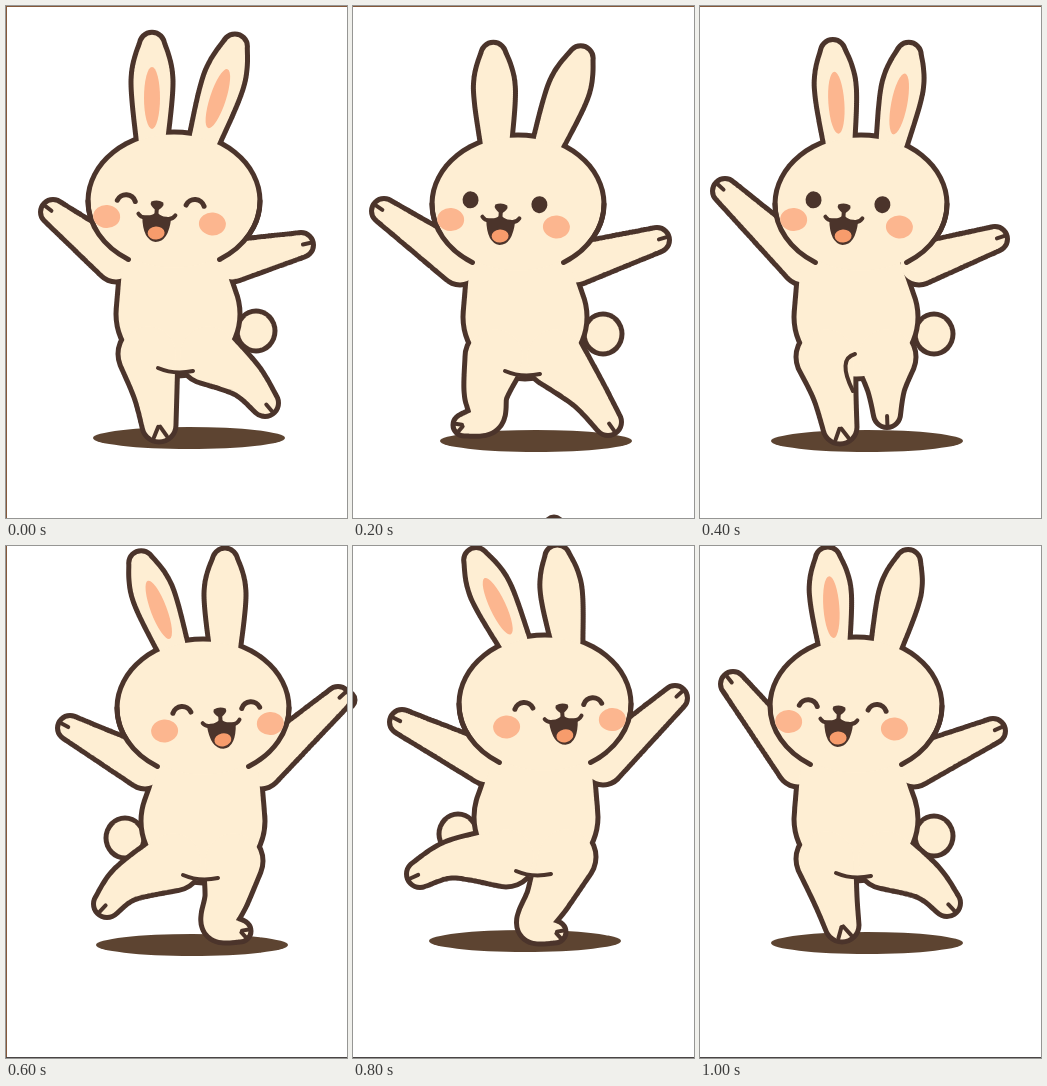
An HTML page that plays this animation: 341x512 px, repeating every 1.2 s.

```html
<!DOCTYPE html>
<html lang="en">
<head>
<meta charset="utf-8">
<title>Dancing bunny</title>
<style>
  html, body { margin: 0; width: 100%; height: 100%; overflow: hidden; background: #fff; }
  svg { display: block; width: 100%; height: 100%; }
  .ink { fill: #4b342b; }
  .fur { fill: #feeed3; }
  .pink { fill: #fcb68f; }
  .tongue { fill: #f79c6c; }
  .shade { fill: #5d4431; }
  .edge { fill: #85593a; }
  .floor { fill: #4a4544; }
  .line { fill: none; stroke: #4b342b; stroke-width: 4; }
  .bold { stroke-width: 5; }
</style>
</head>
<body>
<svg id="stage" viewBox="0 0 341 512" stroke-linecap="round" stroke-linejoin="round"></svg>
<script>
const STEP = 200;
const HALF = 2.5; // half the outline width
const HEAD = [86, 69];

// Key points only: the rest of the body follows from head, facing and sway.
const poses = [
  { head: [168, 195], facing: -1, sway: 4, tips: [[146, 26], [233, 28]], pinks: 2,
    hands: [[47, 206], [295, 239]],
    planted: [[149, 385], [153, 419]], lifted: [[238, 372], [259, 397]], edges: "left top" },
  { head: [165, 198], facing: -1, sway: 7, tips: [[140, 37], [232, 41]], pinks: 0, open: true,
    hands: [[31, 205], [304, 234]],
    planted: [[133, 385], [133, 411], [111, 419]], lifted: [[233, 385], [255, 416]],
    edges: "top", peek: [201, 519] },
  { head: [161, 198], facing: -1, sway: -5, tips: [[132, 34], [211, 37]], pinks: 2, open: true,
    hands: [[25, 185], [295, 233]],
    planted: [[134, 385], [140, 421]], lifted: [[186, 380], [187, 408]],
    edges: "top", fold: [[-3, 74], [-19, 42], [-1, 37]] },
  { head: [197, 162], facing: 1, sway: 0, tips: [[131, 6], [219, 3]], pinks: 1,
    hands: [[64, 182], [332, 153]],
    planted: [[221, 350], [213, 378], [234, 385]], lifted: [[122, 336], [101, 358]], edges: "left bottom" },
  { head: [192, 158], facing: 1, sway: -9, tips: [[118, 3], [203, 0]], pinks: 1,
    hands: [[49, 176], [322, 152]],
    planted: [[196, 350], [181, 379], [202, 386]], lifted: [[100, 313], [67, 328]],
    edges: "bottom", peek: [-6, 154] },
  { head: [156, 160], facing: -1, sway: 0, tips: [[127, 2], [211, 5]], pinks: 1,
    hands: [[33, 138], [293, 185]],
    planted: [[135, 350], [142, 379]], lifted: [[225, 334], [247, 357]], edges: "bottom" }
];

const EDGES = {
  left: ["edge", 0, 0, 1, 512], top: ["edge", 0, 0, 341, 1], bottom: ["floor", 0, 511, 341, 1]
};

const add = ([x, y], dx, dy) => [x + dx, y + dy];
const mix = (a, b, t) => a.map((v, i) => v + (b[i] - v) * t);
const angle = (a, b) => Math.atan2(b[1] - a[1], b[0] - a[0]);
const polar = (p, a, r) => add(p, r * Math.cos(a), r * Math.sin(a));

const path = (d, cls) => `<path class="${cls}" d="${d}"/>`;
const oval = ([x, y], rx, ry, cls, turn = 0) =>
  `<ellipse class="${cls}" cx="${x}" cy="${y}" rx="${rx}" ry="${ry}" transform="rotate(${turn} ${x} ${y})"/>`;
const ring = (p, rx, ry = rx) =>
  oval(p, rx + HALF, ry + HALF, "ink") + oval(p, rx - HALF, ry - HALF, "fur");
const bend = ([a, b, c]) => path(`M${a}Q${b} ${c}`, "line");

// Gives each point of a chain its radius.
const joints = (points, radii) => points.map((p, i) => [...p, radii[i]]);

const spline = (a, b, c, d, t) => b.map((v, i) => v + t / 2 * (c[i] - a[i]
  + t * (2 * a[i] - 5 * v + 4 * c[i] - d[i] + t * (3 * (v - c[i]) + d[i] - a[i]))));

// A soft limb: closely spaced discs along a curve of [x, y, radius].
function limb(chain, grow) {
  let d = "";
  for (let i = 0; i < chain.length - 1; i++) {
    const a = chain[i], b = chain[i + 1];
    for (let k = 0; k <= 30; k++) {
      const [x, y, r] = spline(chain[i - 1] || a, a, b, chain[i + 2] || b, k / 30);
      const w = r + grow;
      d += `M${(x - w).toFixed(2)},${y.toFixed(2)}` +
        `a${w},${w} 0 1 1 ${2 * w},0a${w},${w} 0 1 1 ${-2 * w},0`;
    }
  }
  return d;
}

// Short marks at the end of a hand or foot.
function toes(chain, spread) {
  const [a, b] = chain.slice(-2);
  const dir = angle(a, b);
  return spread.map(s =>
    path(`M${polar(b, dir + s, 2)}L${polar(b, dir + s, b[2] * 0.8)}`, "line")).join("");
}

function chin([x, y]) {
  const [rx, ry] = HEAD;
  const dx = rx * 0.53, dy = ry * 0.848;
  return [-1, 1].map(s => path(
    `M${x + s * rx},${y}A${rx},${ry} 0 0 ${s > 0 ? 1 : 0} ${x + s * dx},${y + dy}`, "line bold")).join("");
}

function face(p) {
  const f = p.facing;
  const [x, y] = add(p.head, 17 * f, 5);
  const pair = (gap, dy, make) => [-1, 1].map(s => make([s * gap - 3.5 * f, dy])).join("");
  const eye = ([ex, ey]) => p.open ? oval([ex, ey], 8, 8.5, "ink")
    : path(`M${ex - 9},${ey + 4}a9.5,9 0 0 1 18,0`, "line bold");
  return `<g transform="translate(${x} ${y}) rotate(${-4 * f})">` +
    pair(34.5, -7, eye) +
    pair(53, 14, c => oval(c, 13.5, 11.5, "pink")) +
    path("M-6,-4Q0,-7 6,-4Q8,0 0,5Q-8,0 -6,-4Z", "ink") +
    path("M0,2V9M-18,9Q-15,13 -10,12Q-3,12 0,8Q3,12 10,12Q16,13 19,8", "line") +
    path("M-14,11Q-5,13 0,8Q5,13 15,11Q14,35 1,36Q-12,35 -14,11Z", "ink") +
    oval([1, 27], 8.5, 6.5, "tongue", -8) + "</g>";
}

function draw(p) {
  const { head, facing: f } = p;
  const hips = add(head, p.sway, 113);
  const chest = add(head, p.sway + 6 * f, 65);

  const ears = p.tips.map((tip, i) => {
    const base = add(head, (i ? 26.5 : -26.5) - 4.5 * f, -63);
    return joints([base, mix(base, tip, 0.55), mix(base, tip, 0.88)], [16, 21, 12.5]);
  });
  const arms = p.hands.map((hand, i) =>
    joints([add(head, i ? 58 : -58, 60), hand], [21, 12.5]));
  const planted = joints([add(hips, 30 * f, 40), ...p.planted], [30, 22, 17, 11]);
  const lifted = joints([add(hips, -30 * f, 40), ...p.lifted], [30, 19, 13.5]);
  const body = [...ears, ...arms, joints([chest, hips], [52, 62]), planted, lifted];

  const layer = (cls, grow) => body.map(c => path(limb(c, grow), cls)).join("") +
    oval(head, HEAD[0] + grow, HEAD[1] + grow, cls);
  const fold = p.fold || [[-20, 54], [-4, 61], [15, 57]];
  const inner = ears.slice(0, p.pinks).map(([a, b, c]) =>
    oval(mix(a, c, 0.43), 31, 8, "pink", angle(a, c) * 180 / Math.PI));

  return [
    ...p.edges.split(" ").map(e => {
      const [cls, x, y, w, h] = EDGES[e];
      return `<rect class="${cls}" x="${x}" y="${y}" width="${w}" height="${h}"/>`;
    }),
    p.peek ? ring(p.peek, 8) : "",
    oval(add(hips, -11 * f, 124), 96, 11, "shade"),
    ring(add(hips, -78 * f, 17), 19, 20),
    layer("ink", HALF),
    layer("fur", -HALF),
    chin(head),
    bend(fold.map(([dx, dy]) => add(hips, dx, dy))),
    ...arms.map(a => toes(a, [0])),
    toes(planted, [-0.5, 0.5]),
    toes(lifted, [0]),
    ...inner,
    face(p)
  ].join("");
}

const stage = document.getElementById("stage");
stage.innerHTML = poses.map(p => `<g>${draw(p)}</g>`).join("");

const count = poses.length;
[...stage.children].forEach((g, i) => {
  const shown = poses.map((_, k) => ({ opacity: +(k === i), offset: k / count, easing: "step-end" }));
  shown.push({ opacity: +(i === count - 1), offset: 1 });
  g.animate(shown, { duration: STEP * count, iterations: Infinity });
});
</script>
</body>
</html>
```
